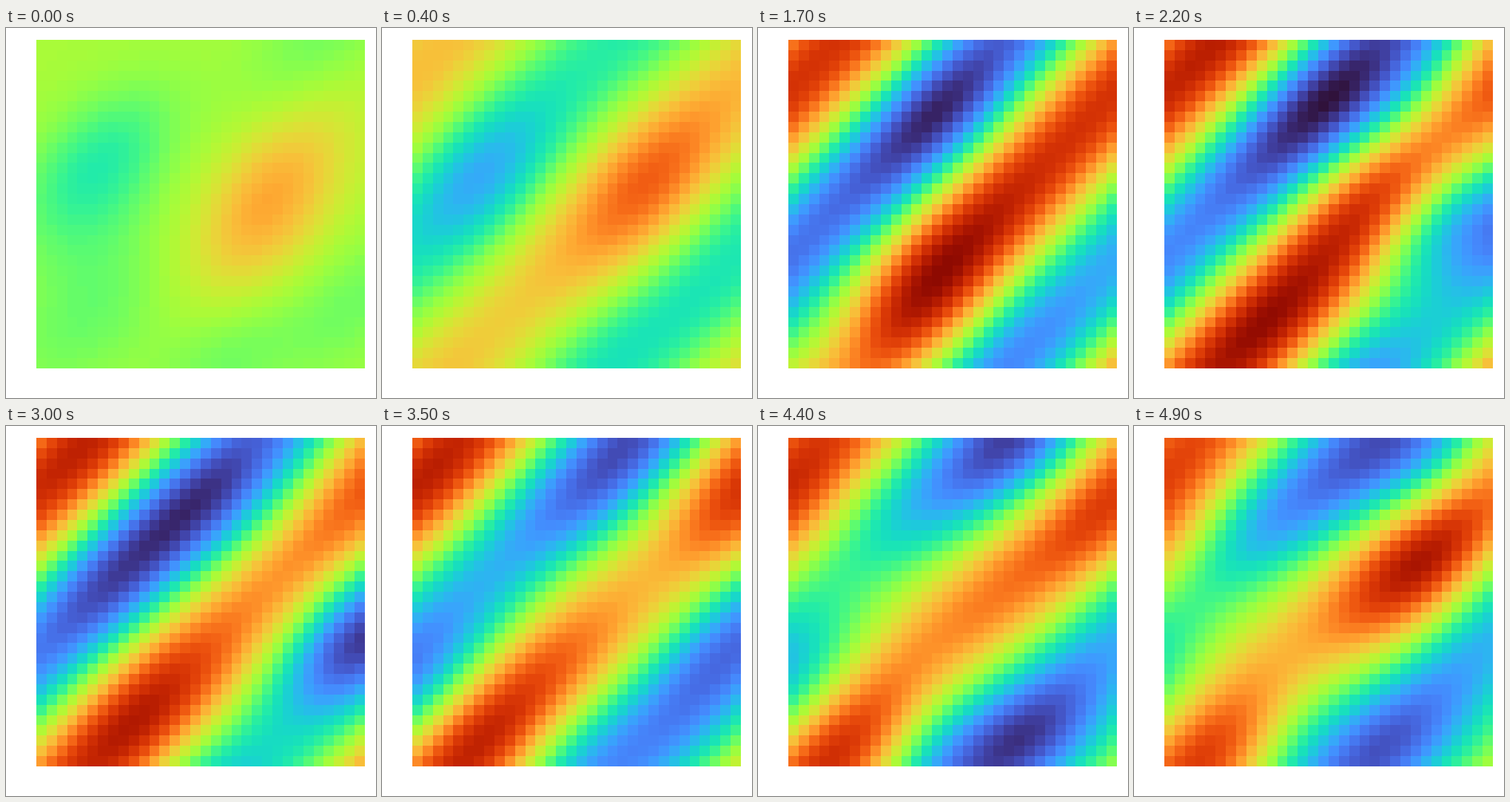
A matplotlib script that plays this animation: 500x500 px, repeating every 5000 ms.

```python
import numpy as np
import matplotlib.pyplot as plt
from matplotlib.animation import FuncAnimation

STAGE, LEFT, TOP, SIDE = 500, 41, 16, 444
CELLS, FRAMES, INTERVAL = 32, 50, 100
ALONG, ACROSS = 0.20, 0.115  # reach of a key point, relative to the stripes

axis = (np.arange(CELLS) + 0.5) / CELLS
GRID = np.stack(np.meshgrid(axis, axis), axis=-1).reshape(-1, 2)


def bump(a, b):
    """Gaussian falloff, stretched along the rising diagonal."""
    dx, dy = np.moveaxis(a[:, None] - b[None], -1, 0)
    return np.exp(-((dx - dy) / ALONG) ** 2 / 4 - ((dx + dy) / ACROSS) ** 2 / 4)


def field(amplitude, crest, *peaks):
    """Diagonal wave pulled to the given level at a few peaks (x, y, level)."""
    x, y, level = np.array(peaks).T
    spots = np.column_stack([x - LEFT, y - TOP]) / SIDE

    def wave(p):
        return 0.51 + amplitude * np.cos(2 * np.pi * (p.sum(axis=1) - crest))

    overlap = bump(spots, spots) + 0.03 * np.eye(len(spots))
    weights = np.linalg.solve(overlap, level - wave(spots))
    return (wave(GRID) + bump(GRID, spots) @ weights).reshape(CELLS, CELLS)


calm = field(
    0, 0,
    (122, 185, .35), (120, 300, .42), (145, 390, .44), (55, 430, .45),
    (350, 240, .70), (390, 150, .62), (335, 345, .57), (300, 430, .45),
    (470, 370, .44), (420, 25, .45))

stripes = field(
    0.30, 1.12,
    (140, 215, .10), (60, 270, .16), (265, 105, .24),
    (370, 205, .90), (290, 280, .84))

steep = field(
    0.36, 1.155,
    (250, 125, .04), (140, 225, .12), (270, 300, .97), (190, 400, .90),
    (100, 440, .64), (255, 440, .52), (465, 310, .24))

deep = field(
    0.36, 1.16,
    (265, 90, 0), (205, 160, .05), (75, 280, .17), (115, 35, .90),
    (180, 405, .97), (350, 215, .82), (370, 120, .49), (395, 240, .50),
    (455, 285, .18), (400, 370, .30), (330, 445, .23))

split = field(
    0.33, 1.155,
    (260, 110, .03), (145, 215, .06), (330, 35, .10), (115, 45, .88),
    (180, 400, .93), (320, 240, .73), (395, 180, .73), (370, 120, .49),
    (430, 215, .54), (450, 300, .09), (385, 400, .30))

merge = field(
    0.28, 1.12,
    (65, 85, .90), (350, 35, .09), (190, 130, .32), (130, 220, .38),
    (60, 340, .24), (130, 435, .90), (395, 180, .69), (475, 125, .86),
    (375, 420, .04), (430, 340, .13), (240, 420, .37), (480, 455, .47))

regrow = field(
    0.26, 1.10,
    (60, 45, .84), (45, 180, .62), (320, 40, .08), (415, 50, .36),
    (150, 150, .27), (120, 235, .41), (400, 180, .94), (220, 325, .66),
    (125, 440, .81), (215, 405, .48), (340, 445, .09), (480, 455, .50))

TIMES = np.array([0, 9, 17, 22, 30, 39, 49])
POSES = np.array([calm, stripes, steep, deep, split, merge, regrow])
SLOPES = np.gradient(POSES, TIMES, axis=0)


def state(frame):
    """Cubic Hermite blend between neighbouring poses."""
    i = min(np.searchsorted(TIMES, frame, side="right") - 1, len(TIMES) - 2)
    span = TIMES[i + 1] - TIMES[i]
    s = (frame - TIMES[i]) / span
    ease = s * s * (3 - 2 * s)
    tangents = SLOPES[i] * s * (1 - s) ** 2 - SLOPES[i + 1] * s * s * (1 - s)
    return POSES[i] * (1 - ease) + POSES[i + 1] * ease + span * tangents


fig = plt.figure(figsize=(5, 5), dpi=100, facecolor="white")
ax = fig.add_axes([LEFT / STAGE, 1 - (TOP + SIDE) / STAGE,
                   SIDE / STAGE, SIDE / STAGE])
ax.axis("off")
image = ax.imshow(state(0), cmap="turbo", vmin=0, vmax=1,
                  interpolation="nearest", aspect="auto")


def update(frame):
    image.set_data(np.clip(state(frame), 0, 1))
    return [image]


anim = FuncAnimation(fig, update, frames=FRAMES, interval=INTERVAL,
                     repeat=True, repeat_delay=0)
plt.show()
```
